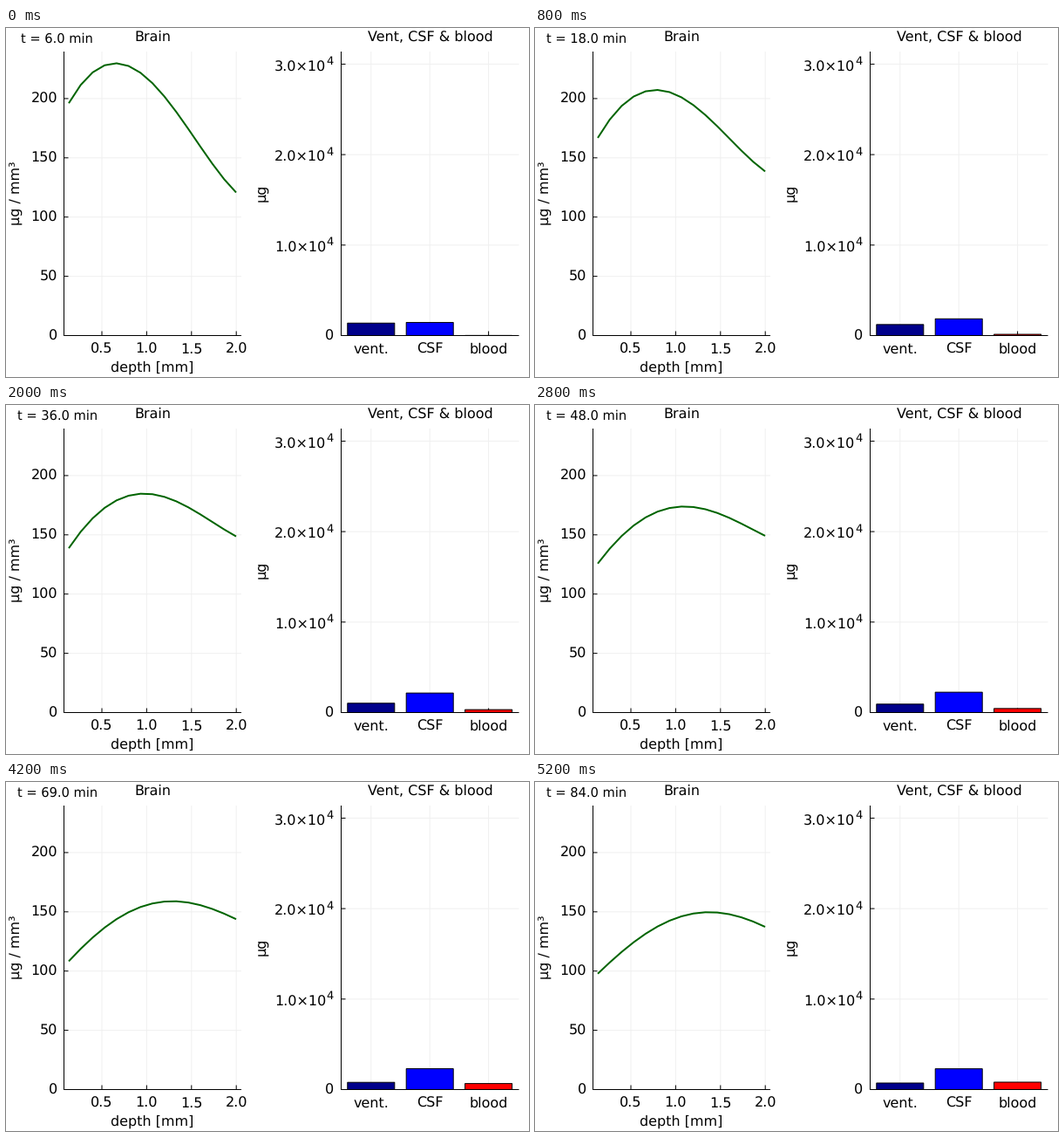
Animation, 600 px wide and 400 px high, one loop 5.4 s. Source, as a matplotlib script:

```python
import numpy as np
import matplotlib.pyplot as plt
from matplotlib.animation import FuncAnimation
from matplotlib.patches import Rectangle

plt.rcParams["font.family"] = "DejaVu Sans"
plt.rcParams["text.hinting"] = "none"
PX = 0.72  # points per pixel at 100 dpi
BASE = 352.5
FRAMES, STEP = 27, 200

fig = plt.figure(figsize=(6, 4), dpi=100, facecolor="white")
ax = fig.add_axes([0, 0, 1, 1])
ax.set_xlim(0, 600)
ax.set_ylim(400, 0)
ax.axis("off")


def line(x0, y0, x1, y1, color="black", z=2):
    ax.plot([x0, x1], [y0, y1], color=color, lw=PX, zorder=z, snap=False,
            solid_capstyle="butt")


def text(x, y, s, size=16, ha="center", rot=0):
    return ax.text(x, y, s, fontsize=size * PX, ha=ha, va="baseline",
                   rotation=rot, rotation_mode="anchor", zorder=6)


def panel(left, right, xticks, yticks):
    for x in xticks:
        line(x, 27, x, BASE, "#f0f0f0", 1)
        line(x, BASE, x, BASE - 5)
    for y in yticks:
        line(left, y, right, y, "#f0f0f0", 1)
        line(left, y, left + 5, y)
    line(left, BASE, right, BASE)
    line(left, 27, left, BASE + 0.5)


# left panel: concentration over depth
depth_ticks = [110 + 51.4 * i for i in range(4)]
conc_ticks = [BASE - 67.9 * i for i in range(1, 5)]
panel(66.5, 270, depth_ticks, conc_ticks)
for i, x in enumerate(depth_ticks):
    text(x, 372.6, f"{0.5 * (i + 1):.1f}")
for i, y in enumerate([BASE] + conc_ticks):
    text(59, y + 5.2, str(50 * i), ha="right")
text(168, 14.7, "Brain")
text(168, 393.7, "depth [mm]")
text(17, 189, "µg / mm³", rot=90)

# right panel: amounts
bar_x = [418.8 + 67.4 * i for i in range(3)]
mass_ticks = [BASE - 103.7 * i for i in range(1, 4)]
panel(384.5, 588.5, bar_x, mass_ticks)
for x, name in zip(bar_x, ["vent.", "CSF", "blood"]):
    text(x, 372.6, name)
text(376, BASE + 5.2, "0", ha="right")
for i, y in enumerate(mass_ticks):
    text(367.5, y + 8, f"{i + 1}.0×10", ha="right")
    text(376, y + 0.5, "4", 13, ha="right")
text(487, 14.7, "Vent, CSF & blood")
text(298, 189, "µg", rot=90)

curve, = ax.plot([], [], color="#006400", lw=2 * PX, zorder=4,
                 solid_joinstyle="round", solid_capstyle="butt")
clock = text(58.7, 16.7, "", 14.67)
bars = [ax.add_patch(Rectangle((x - 27, BASE), 54, 0, facecolor=c,
                               edgecolor="black", lw=PX, zorder=3, snap=False))
        for x, c in zip(bar_x, ["#00008b", "#0000ff", "#ff0000"])]


def profile(s, t):
    """Curve height on the stage at depth s (-1 to 1) and minute t."""
    mid = 54.8 + 1.42 * t - 0.00285 * t**2
    bow = 87.5 - 0.88 * t + 0.0042 * t**2
    tilt = 104.2 * np.exp(-t / 24) - 30
    skew = 51 - 1.05 * t + 0.005 * t**2
    q = s**2
    return mid + bow * q * (1 - q / 10) + s * (tilt + skew * (1 - q))


def amounts(t):
    """Bar heights: the ventricle drains, CSF saturates, blood fills."""
    return (4.5 + 10.7 * np.exp(-t / 66),
            27.2 - 15.2 * np.exp(-t / 25) - 0.034 * t,
            0.107 * t - 0.5)


depths = np.linspace(-1, 1, 15)


def draw(k):
    minute = 6 + 3 * k
    curve.set_data(168 + 96 * depths, profile(depths, minute))
    for bar, height in zip(bars, amounts(minute)):
        bar.set_height(-height)
    clock.set_text(f"t = {minute:.1f} min")
    return [curve, clock, *bars]


anim = FuncAnimation(fig, draw, frames=FRAMES, interval=STEP, repeat=True,
                     repeat_delay=0, blit=False)
plt.show()
```
